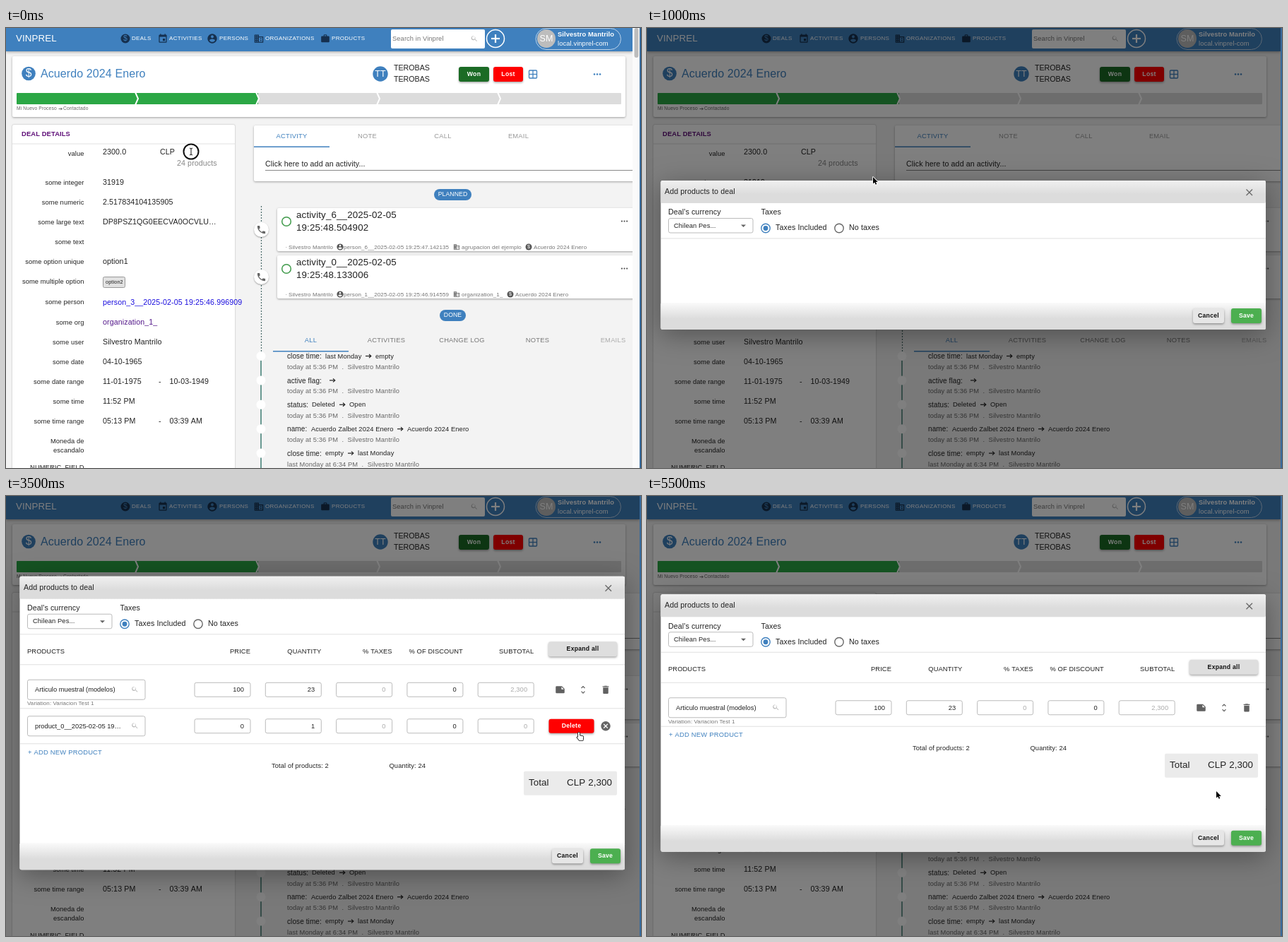
These frames come from a looping animation (899 px wide and 623 px high, 5900 ms). An HTML page with a canvas:

```html
<!DOCTYPE html>
<html lang="en">
<head>
<meta charset="utf-8">
<title>Deal products</title>
<style>
html, body { margin: 0; width: 100%; height: 100%; overflow: hidden; }
canvas { display: block; }
</style>
</head>
<body>
<canvas id="stage" width="899" height="623"></canvas>
<script>
const stage = document.getElementById('stage');
const screen2d = stage.getContext('2d'), layer2d = stage.cloneNode().getContext('2d');
let c = screen2d;
const LOOP = 5900, BLUE = '#3f80be', INK = '#222', GREY = '#757575', NAVY = '#16304f';
const USER = 'Silvestro Mantrilo', DEAL = 'Acuerdo 2024 Enero';

const icons = {
  phone: 'M6.6 10.8c1.4 2.8 3.8 5.1 6.6 6.6l2.2-2.2c.3-.3.7-.4 1-.2 1.1.4 2.3.6 3.6.6.6 0 1 .4 1 1V20c0 .6-.4 1-1 1C10.6 21 3 13.4 3 4c0-.6.4-1 1-1h3.5c.6 0 1 .4 1 1 0 1.2.2 2.4.6 3.6.1.3 0 .7-.3 1z',
  trash: 'M6 19c0 1.1.9 2 2 2h8c1.1 0 2-.9 2-2V7H6zM19 4h-3.5l-1-1h-5l-1 1H5v2h14z',
  unfold: 'M12 5.8L15.2 9l1.4-1.4L12 3 7.4 7.6 8.8 9zM12 18.2L8.8 15l-1.4 1.4L12 21l4.6-4.6L15.2 15z',
  note: 'M22 10l-6-6H4q-2 0-2 2v12q0 2 2 2h16q2 0 2-2zM15 5.5l5.5 5.5H15z',
  search: 'M15.5 14h-1A6.5 6.5 0 1 0 14 14.7v.8l5 5 1.5-1.5zM9.5 14a4.5 4.5 0 1 1 .01 0z',
  cancel: 'M12 2a10 10 0 1 0 .01 0zM17 15.6L15.6 17 12 13.4 8.4 17 7 15.6 10.6 12 7 8.4 8.4 7 12 10.6 15.6 7 17 8.4 13.4 12z',
  org: 'M2 3h10v4h10v14H2zM4 5v2h2V5zM8 5v2h2V5zM4 9v2h2V9zM8 9v2h2V9zM4 13v2h2v-2zM8 13v2h2v-2zM4 17v2h2v-2zM8 17v2h2v-2zM12 9v10h8V9zM15 11h3v2h-3zM15 15h3v2h-3z',
  person: 'M12 2a10 10 0 1 0 .01 0zM12 5a3 3 0 1 1-.01 0zM12 19.2c-2.5 0-4.7-1.3-6-3.2 0-2 4-3.1 6-3.1s6 1.1 6 3.1c-1.3 1.9-3.5 3.2-6 3.2z',
  event: 'M17 12h-5v5h5zM16 1v2H8V1H6v2H5q-2 0-2 2v14q0 2 2 2h14q2 0 2-2V5q0-2-2-2h-1V1zM19 19H5V8h14z',
  work: 'M20 6h-4V4q0-2-2-2h-4Q8 2 8 4v2H4Q2 6 2 8v11q0 2 2 2h16q2 0 2-2V8q0-2-2-2zM14 6h-4V4h4z'
};
const arrowCursor = new Path2D('M0 0v9.5l2.2-2 1.5 3.3 1.6-.7-1.5-3.2h3z');
const handCursor = new Path2D('M0 0c.8 0 1.2.5 1.2 1.2v3l4 .9c.9.2 1.2.8 1.1 1.6l-.6 4.3h-5l-3.4-4.2c.4-.8 1.1-.6 1.6 0V1.2C-1.1.5-.8 0 0 0z');
for (const name in icons) icons[name] = new Path2D(icons[name]);

function text(s, x, y, size = 10.67, color = INK, { align = 'left', bold = false, gap = 0.1 } = {}) {
  c.font = `${bold ? 'bold ' : ''}${size}px "Liberation Sans", Arial, sans-serif`;
  c.letterSpacing = gap + 'px';
  c.textAlign = align;
  c.textBaseline = 'middle';
  c.fillStyle = color;
  c.fillText(s, x, y);
}
function paint(fill, stroke, width = 1) {
  if (fill) { c.fillStyle = fill; c.fill(); }
  if (stroke) { c.strokeStyle = stroke; c.lineWidth = width; c.stroke(); }
}
function box(x, y, w, h, r, fill, stroke, width) {
  c.beginPath();
  c.roundRect(x, y, w, h, r);
  paint(fill, stroke, width);
}
function circle(x, y, r, fill, stroke, width) {
  c.beginPath();
  c.arc(x, y, r, 0, 7);
  paint(fill, stroke, width);
}
function line(color, width, ...points) {
  c.beginPath();
  for (let i = 0; i < points.length; i += 2) c.lineTo(points[i], points[i + 1]);
  paint(null, color, width);
}
function raised(x, y, w, h, r, fill, blur = 3, drop = 1) {
  c.save();
  c.shadowColor = 'rgba(0,0,0,.35)';
  c.shadowBlur = blur;
  c.shadowOffsetY = drop;
  box(x, y, w, h, r, fill);
  c.restore();
}
function icon(name, x, y, size, color) {
  c.save();
  c.translate(x - size / 2, y - size / 2);
  c.scale(size / 24, size / 24);
  c.fillStyle = color;
  c.fill(icons[name], 'evenodd');
  c.restore();
}
function dollar(x, y, r, color, sign) {
  circle(x, y, r, color);
  text('$', x, y + r * 0.05, r * 1.6, sign, { align: 'center', gap: 0 });
}
function dots(x, y, color, step) {
  for (let i = -1; i < 2; i++) circle(x + i * step, y, step / 3.2, color);
}
function arrow(x, y) {
  line(INK, 1.2, x - 4, y, x + 3, y);
  line(INK, 1.2, x + 1, y - 2.5, x + 3.8, y, x + 1, y + 2.5);
}
function button(label, x, y, w, h, fill, color) {
  raised(x, y, w, h, 3, fill, 3, 1.5);
  text(label, x + w / 2, y + h / 2, 8.67, color, { align: 'center', bold: true, gap: 0.25 });
}
function chip(label, x, y, w) {
  box(x, y, w, 16, 8, BLUE);
  text(label, x + w / 2, y + 8, 8.67, '#fff', { align: 'center' });
}
function tabs(labels, x, y, lineY) {
  labels.forEach((label, i) => text(label, x + i * 107, y, 9.33,
    i ? (i === 4 ? '#aaa' : lineY < 200 ? '#999' : '#777') : BLUE, { align: 'center', gap: 0.25 }));
  box(x - 53.5, lineY, 107, 1.5, 0, BLUE);
}

function navbar(right) {
  raised(0, -5, right, 38, 0, BLUE, 4, 1);
  text('VINPREL', 14, 15, 13.33, '#fff');
  dollar(169, 15, 6.5, NAVY, BLUE);
  icon('event', 222, 15, 15, NAVY);
  icon('person', 292, 15, 16, NAVY);
  icon('org', 358, 15, 15, NAVY);
  icon('work', 452, 15, 14, NAVY);
  [['DEALS', 178], ['ACTIVITIES', 231], ['PERSONS', 302], ['ORGANIZATIONS', 367], ['PRODUCTS', 461]]
    .forEach(([label, x]) => text(label, x, 15, 8, '#fff', { gap: 0.3 }));
  box(545, 2, 133, 27, 2, '#fff');
  text('Search in Vinprel', 547, 15.5, 9.33, GREY);
  icon('search', 663, 15, 11, '#bbb');
  circle(693, 15, 12.5, null, '#fff', 1.5);
  line('#fff', 2.2, 687, 15, 699, 15);
  line('#fff', 2.2, 693, 9, 693, 21);
  box(750, 0.5, 120.5, 30, 15, null, '#b9d2ea');
  circle(765, 15, 13, '#bdbdbd');
  text('SM', 765, 15.5, 12.5, '#fff', { align: 'center' });
  text(USER, 781, 9.5, 9.33, '#fff', { bold: true });
  text('local.vinprel-com', 781, 22.5, 9.33, '#fff');
}

function dealCard() {
  raised(9, 40, 868, 86, 2, '#fff');
  dollar(32, 64.5, 9.8, BLUE, '#fff');
  text(DEAL, 49, 66, 16, BLUE);
  circle(530, 65, 10.7, BLUE);
  text('TT', 530, 65.5, 12.5, '#fff', { align: 'center' });
  text('TEROBAS', 549, 57.5, 10.67, INK, { gap: 0 });
  text('TEROBAS', 549, 73.5, 10.67, INK, { gap: 0 });
  button('Won', 641, 55, 43, 21, '#1b6b25', '#fff');
  button('Lost', 690, 55, 42, 21, '#f00', '#fff');
  box(740.5, 60, 11, 11, 1, null, BLUE, 1.3);
  line(BLUE, 1.3, 746, 60, 746, 71);
  line(BLUE, 1.3, 740.5, 65.5, 751.5, 65.5);
  dots(837, 65.5, BLUE, 4);
  box(15, 92, 856, 16, 1, '#dcdcdc');
  box(15, 92, 342, 16, 1, '#2ba745');
  for (let x = 186; x < 800; x += 171) line('#fff', 2, x - 3, 91, x + 1, 100, x - 3, 109);
  text('Mi Nuevo Proceso', 15, 114.5, 6.67, '#666', { gap: 0.15 });
  line('#555', 0.8, 74.5, 114.5, 79, 114.5);
  line('#555', 0.8, 77.5, 113, 79.5, 114.5, 77.5, 116);
  text('Contactado', 81, 114.5, 6.67, '#666', { gap: 0.15 });
}

function details() {
  raised(9, 137, 315, 500, 2, '#fff', 2, 0);
  text('DEAL DETAILS', 22, 150.5, 9.33, '#5f0f78', { bold: true, gap: 0.15 });
  box(9, 163.5, 315, 1, 0, '#e2e2e2');
  [['value', 178, '2300.0'], ['some integer', 219, '31919'], ['some numeric', 247, '2.517834104135905'],
    ['some large text', 275, 'DP8PSZ1QG0EECVA0OCVLU…'], ['some text', 303], ['some option unique', 331, 'option1'],
    ['some multiple option', 359.5], ['some person', 388.5, 'person_3__2025-02-05 19:25:46.996909', '#1a0dde'],
    ['some org', 417, 'organization_1_', '#551a8b'], ['some user', 445, USER], ['some date', 473, '04-10-1965'],
    ['some date range', 501, '11-01-1975', INK, '10-03-1949'], ['some time', 529, '11:52 PM'],
    ['some time range', 557, '05:13 PM', INK, '03:39 AM'], ['Moneda de', 585.5], ['escandalo', 598.5], ['NUMERIC_FIELD', 622.5]
  ].forEach(([label, y, value, color, end]) => {
    text(label, 110.5, y, 9.33, INK, { align: 'right' });
    if (value) text(value, 137, label === 'value' ? 176.5 : y + 0.5, 10.67, color);
    if (end) {
      text('-', 216, y + 0.5);
      text(end, 231.5, y + 0.5);
    }
  });
  text('CLP', 218, 176.5);
  text('24 products', 242, 192.5, 10.67, '#888');
  box(137.5, 352.5, 31, 15, 2, '#e2e2e2', '#999');
  text('option2', 141, 360, 7.33);
}

function activity(y, title, person, org, dealX, right) {
  raised(384, y, right - 374, 61, 2, '#fff');
  raised(351, y + 20, 21, 21, 10.5, '#fff', 2, 1);
  icon('phone', 361.5, y + 30.5, 15, '#666');
  circle(397, y + 19, 6.3, null, '#3f9a4a', 1.5);
  text(title[0], 411, y + 10, 13.33, INK, { gap: 0.15 });
  text(title[1], 411, y + 28.5, 13.33, INK, { gap: 0.15 });
  dots(875.5, y + 18.5, '#555', 3.6);
  const label = (s, x) => text(s, x, y + 55.5, 8, GREY);
  label('·', 395.5);
  label(USER, 400);
  icon('person', 473, y + 55, 11, '#555');
  label(person, 478);
  icon('org', 638, y + 55, 10, '#666');
  label(org, 645);
  dollar(dealX, y + 55, 4.5, '#555', '#fff');
  label(DEAL, dealX + 7);
}

function feed(right) {
  raised(351, 138, right - 341, 79, 2, '#fff');
  tabs(['ACTIVITY', 'NOTE', 'CALL', 'EMAIL'], 404.5, 153.5, 167.5);
  text('Click here to add an activity...', 367, 193);
  box(367, 201, right - 367, 1, 0, '#888');
  chip('PLANNED', 606, 228, 53);
  c.setLineDash([2, 2]);
  line('#4a6b69', 1.2, 361.5, 252, 361.5, 460);
  c.setLineDash([]);
  line('#3c7d72', 1.5, 361, 462, 361, 623);
  activity(255, ['activity_6__2025-02-05', '19:25:48.504902'], 'person_6__2025-02-05 19:25:47.142135', 'agrupacion del ejemplo', 740, right);
  activity(322, ['activity_0__2025-02-05', '19:25:48.133006'], 'person_1__2025-02-05 19:25:46.914559', 'organization_1_', 714, right);
  chip('DONE', 614, 399, 37);
  tabs(['ALL', 'ACTIVITIES', 'CHANGE LOG', 'NOTES', 'EMAILS'], 431.5, 442, 457);
  [['close time:', 452, 'last Monday', 513, 'empty'], ['active flag:', 452, '', 462, ''],
    ['status:', 433, 'Deleted', 476, 'Open'], ['name:', 432, 'Acuerdo Zalbet 2024 Enero', 558, DEAL],
    ['close time:', 452, 'empty', 488, 'last Monday']
  ].forEach(([label, x, from, arrowX, to], i) => {
    const y = 465.5 + i * 34.4;
    circle(361, y - 1, 6.5, '#fff');
    text(label, 398, y, 10);
    text(from, x, y - 0.5, 9.33);
    arrow(arrowX, y - 1);
    text(to, arrowX + 10, y - 0.5, 9.33);
    text(`${i < 4 ? 'today at 5:36' : 'last Monday at 6:34'} PM  .  ${USER}`, 398, y + 15, 9.33, '#666');
  });
}

function page(modal) {
  const right = modal ? 897 : 887;
  c.fillStyle = '#f3f3f3';
  c.fillRect(0, 0, 899, 623);
  c.save();
  c.beginPath();
  c.rect(0, 0, right, 623);
  c.clip();
  dealCard();
  details();
  feed(right);
  navbar(right);
  c.restore();
  if (!modal) {
    box(887, 0, 10, 623, 0, '#fafafa');
    box(889.5, 0, 6, 42, 3, '#bdbdbd');
  }
}

function productField(y, label, focus) {
  box(30.5, y - 14, 166.5, 28, 2.5, '#fff', focus ? BLUE : '#bbb', focus || 1);
  c.save();
  c.beginPath();
  c.rect(31, y - 13, 134, 26);
  c.clip();
  text(label, 41, y + 0.5, 9.33, INK, { gap: 0 });
  c.restore();
  icon('search', 182.5, y - 0.5, 11, focus > 1 ? '#333' : '#bbb');
}

function amounts(y, values, hovered) {
  values.forEach((value, i) => {
    const x = 267 + i * 100.3;
    box(x, y - 10, 79, 20, 2.5, '#fff', i === hovered ? INK : '#bbb');
    text(value, x + 70, y + 0.5, 9.33, i === 2 || i === 4 ? '#aaa' : INK, { align: 'right' });
  });
}

function rowIcons(y, hover) {
  if (hover) {
    c.beginPath();
    c.ellipse(849, y, 15, 10, 0, 0, 7);
    paint('#efefef');
  }
  icon('note', 784.5, y, 15, '#616161');
  icon('unfold', 817, y, 15, '#616161');
  icon('trash', 849, y, 15, '#616161');
}

function products(top, t, rows) {
  const priced = t >= 1800, rule = y => box(20, top + y, 856, 1, 0, '#e0e0e0');
  text('PRODUCTS', 30, top + 106.5, 9.33);
  ['PRICE', 'QUANTITY', '% TAXES', '% OF DISCOUNT', 'SUBTOTAL'].forEach((label, i) =>
    text(label, 346 + i * 100.3, top + 106.5, 9.33, INK, { align: 'right' }));
  button('Expand all', 768, top + 92.5, 97, 21, '#dedede', '#111');
  rule(124.5);
  const first = top + 160.5;
  productField(first, 'Articulo muestral (modelos)', 0);
  text('Variation: Variacion Test 1', 30, first + 20, 8, GREY);
  amounts(first, ['100', '23', '0', '0', priced ? '2,300' : '0'], t < 2000 ? 1 : -1);
  rowIcons(first);
  rule(186.5);
  if (rows > 1) {
    const y = top + 212, focus = t < 1400 ? 1 : t < 2900 ? 2 : 0;
    productField(y, focus ? 'product_0__2025-02-05 19:25:46' : 'product_0__2025-02-05 19…', focus);
    amounts(y, ['0', '1', '0', '0', '0']);
    if (t < 2900) rowIcons(y, t >= 2400);
    else {
      button('Delete', 768.5, y - 10, 64, 20, t >= 5100 ? '#f63c3a' : '#f00', '#fff');
      icon('cancel', 849, y, 16, '#666');
    }
    rule(236.5);
  }
  const y = top + (rows > 1 ? 249.5 : 199);
  text('+ ADD NEW PRODUCT', 31, y, 9.33, BLUE, { gap: 0.25 });
  text('Total of products: 2', 376, y + 19.5, 9.33);
  text('Quantity: 24', 542.5, y + 19.5, 9.33);
  box(733, y + 26.5, 132, 34, 2, '#ebebeb');
  text('Total', 740, y + 43.5, 13.33);
  text(priced ? 'CLP 2,300' : 'CLP 0', 858, y + 43.5, 13.33, INK, { align: 'right' });
}

function shade(y, h, from, to) {
  const g = c.createLinearGradient(0, y, 0, y + h);
  g.addColorStop(0, from);
  g.addColorStop(0.6, to);
  box(19.5, y, 856.5, h, 2, g);
}

function dialog(t) {
  const rows = t < 1300 ? 0 : t < 5300 ? 2 : 1;
  const height = [211, 364.5, 415.5][rows], top = 321.5 - height / 2, bottom = top + height;
  raised(19.5, top, 856.5, height, 3, '#fff', 36, 7);
  shade(top, 32, '#f0f0f0', '#dcdcdc');
  shade(bottom - 38, 38, '#fafafa', '#dcdcdc');
  text('Add products to deal', 25, top + 16);
  line('#666', 1.2, 848.5, top + 12.5, 857, top + 21);
  line('#666', 1.2, 857, top + 12.5, 848.5, top + 21);
  text("Deal's currency", 30, top + 45.5);
  text('Taxes', 161.5, top + 45.5);
  box(30.5, top + 53.5, 119.5, 20.5, 2.5, '#fff', '#bbb');
  text('Chilean Pes...', 38, top + 64, 9.33);
  c.beginPath();
  c.moveTo(133, top + 62.5);
  c.lineTo(140, top + 62.5);
  c.lineTo(136.5, top + 66);
  paint('#666');
  circle(168, top + 67.5, 6.2, null, BLUE, 1.4);
  circle(168, top + 67.5, 3.4, BLUE);
  text('Taxes Included', 182, top + 67.5);
  circle(272, top + 67.5, 6.2, null, '#666', 1.4);
  text('No taxes', 286, top + 67.5);
  box(20, top + 81.5, 856, 1, 0, '#e0e0e0');
  if (rows) products(top, t, rows);
  button('Cancel', 773, bottom - 30, 44, 21, '#e6e6e6', '#111');
  button('Save', 827, bottom - 30, 43, 21, '#4caf50', '#fff');
}

// backdrop and dialog fade in together, the dialog as one group
function modalLayer(t) {
  const fade = Math.min(1, (t - 650) / 320);
  c.fillStyle = `rgba(0,0,0,${fade / 2})`;
  c.fillRect(0, 0, 897, 623);
  c = layer2d;
  c.clearRect(0, 0, 899, 623);
  dialog(t);
  c = screen2d;
  c.globalAlpha = fade;
  c.drawImage(layer2d.canvas, 0, 0);
  c.globalAlpha = 1;
}

// time, x, y, cursor shape used from that time on
const path = [
  [0, 262, 175, 'text'], [100, 262, 175, 'text'], [300, 248, 190, 'hand'], [400, 246, 192, 'hand'],
  [600, 246, 192, 'arrow'], [900, 304, 190, 'arrow'], [1200, 367, 272, 'arrow'], [1300, 367, 272, 'text'],
  [1900, 367, 272, 'arrow'], [2500, 859, 324, 'hand'], [2600, 859, 324, 'hand'], [2800, 849, 327, 'hand'],
  [2900, 849, 327, 'arrow'], [3200, 857, 347, 'arrow'], [3500, 811, 335, 'hand'], [3800, 807, 328, 'hand'],
  [4300, 806, 327, 'hand'], [5200, 806, 327, 'arrow'], [5500, 806, 418, 'arrow'], [LOOP, 806, 418, 'arrow']
];
const clicks = [-100, 400, 2800, 5100];

function pointer(t) {
  const i = path.findIndex(p => p[0] > t) - 1, [t0, x0, y0, shape] = path[i], [t1, x1, y1] = path[i + 1];
  const u = (t - t0) / (t1 - t0), k = u * u * (3 - 2 * u);
  const x = Math.round(x0 + (x1 - x0) * k), y = Math.round(y0 + (y1 - y0) * k);
  const click = clicks.find(start => t >= start && t < start + 200);
  if (click !== undefined) {
    const r = 19.5 - (t - click) * 0.09;
    circle(x, y, r, 'rgba(255,255,255,.25)', 'rgba(255,255,255,.7)', 4);
    circle(x, y, r, null, '#111', 2);
  }
  if (shape === 'text') {
    line('#111', 1, x - 2, y - 5, x, y - 4, x + 2, y - 5);
    line('#111', 1, x, y - 4, x, y + 4);
    line('#111', 1, x - 2, y + 5, x, y + 4, x + 2, y + 5);
    return;
  }
  const hand = shape === 'hand', outline = hand ? handCursor : arrowCursor;
  c.save();
  c.translate(x, y);
  c.lineJoin = 'round';
  c.lineWidth = 1.7;
  c.strokeStyle = hand ? '#111' : '#fff';
  c.fillStyle = hand ? '#fff' : '#000';
  c.stroke(outline);
  c.fill(outline);
  c.restore();
}

function draw(t) {
  const modal = t >= 700;
  page(modal);
  if (modal) modalLayer(t);
  box(897, 0, 2, 623, 0, '#376a9c');
  pointer(t);
}

// the picture advances ten times a second
let shown = -1;
function tick() {
  const t = Math.floor(performance.now() % LOOP / 100) * 100;
  if (t !== shown) draw(shown = t);
  requestAnimationFrame(tick);
}
tick();
</script>
</body>
</html>
```
